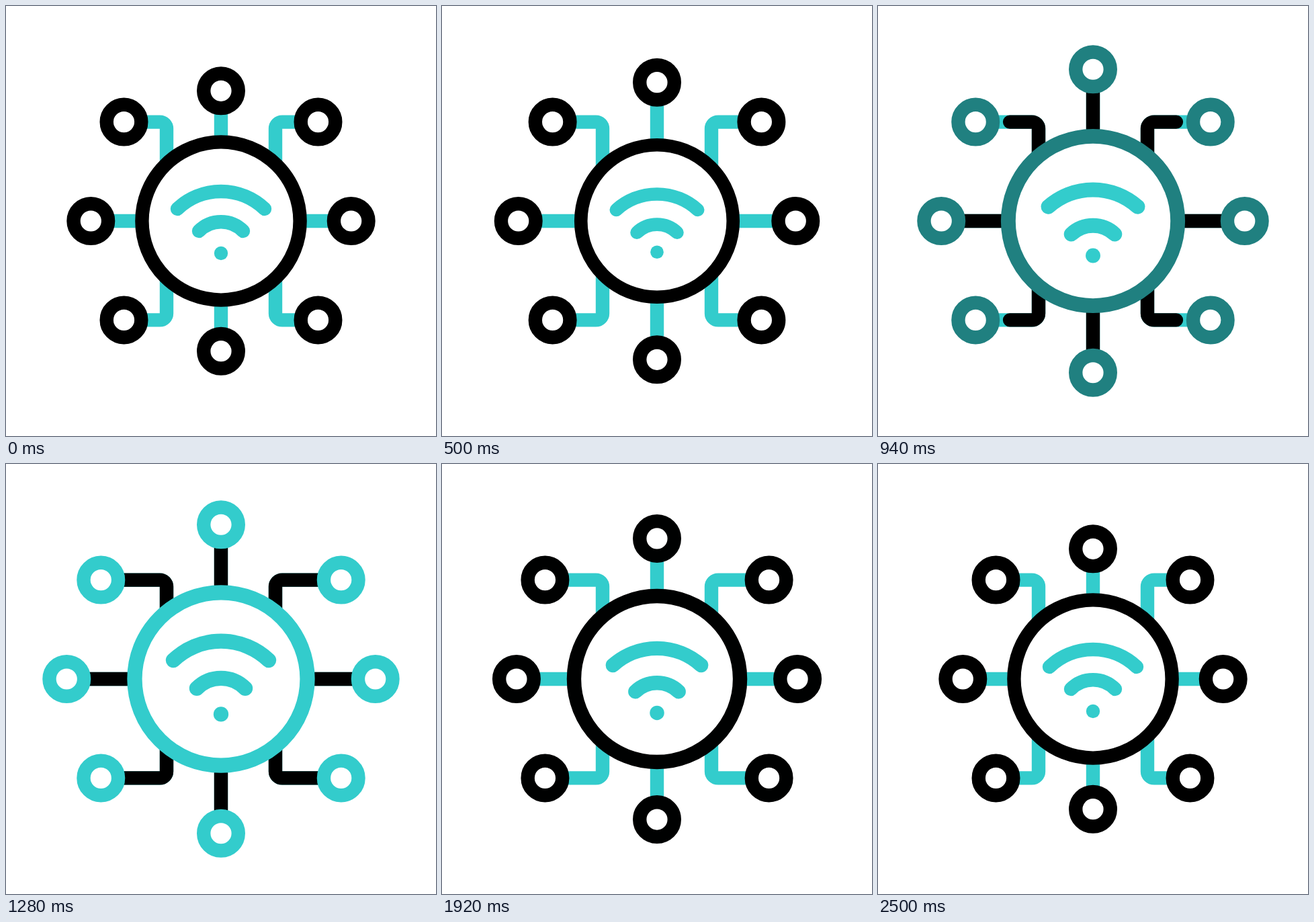
These frames come from a looping animation (640 px wide and 640 px high, 2.92 s). An HTML page:

```html
<!DOCTYPE html>
<html lang="en">
<head>
<meta charset="utf-8">
<title>Wireless network hub</title>
<style>
  html, body { margin: 0; width: 100%; height: 100%; overflow: hidden; background: #fff; }
  svg { display: block; width: 100vw; height: 100vh; }
  path, .ring { stroke-width: 20.4; }
  path { fill: none; }
  .ring { fill: #fff; }
  .wire { stroke: #3cc; }
  .flow { stroke: #000; stroke-linecap: round; }
  .wave { stroke: #3cc; stroke-linecap: round; }
</style>
</head>
<body>
<svg viewBox="-320 -320 640 640">
  <g id="arms"></g>
  <g id="hub">
    <circle class="ring" r="117.6"/>
    <circle cy="48" r="10.2" fill="#3cc"/>
  </g>
</svg>
<script>
const LOOP = 2920;
const svgNS = 'http://www.w3.org/2000/svg';

const ramp = (t, from, to) => Math.min(1, Math.max(0, (t - from) / (to - from)));
const smooth = u => u * u * (3 - 2 * u);
const settle = u => (1 - Math.exp(-4.4 * u)) / (1 - Math.exp(-4.4));
const easeOut = power => u => 1 - (1 - u) ** power;

// Moves from a rest value through steps of [start, end, value, easing].
const motion = (rest, ...steps) => t => steps.reduce(
  (value, [start, end, to, ease = smooth]) => value + (to - value) * ease(ramp(t, start, end)),
  rest);

// Every part first draws in, then springs out and finally returns to rest.
const straight = motion(193.7,
  [0, 300, 182.3], [300, 1620, 231, settle], [1620, 1720, 217], [1720, 2500, 193.7, easeOut(1.4)]);
const bent = motion(144.5,
  [0, 300, 131.5], [300, 1620, 180, settle], [1720, 2500, 144.5, easeOut(1.6)]);
const hubScale = motion(1,
  [0, 300, 0.953], [480, 1720, 1.1, settle], [1720, 2500, 1, easeOut(2.3)]);
const squash = motion(0, [360, 680, 1], [680, 1280, 0], [1500, 2180, 0.75], [2180, 2500, 0]);
const lift = motion(0, [680, 1280, 1], [1500, 2180, 0]);

function add(parent, tag, attrs) {
  const el = document.createElementNS(svgNS, tag);
  for (const key in attrs) el.setAttribute(key, attrs[key]);
  return parent.appendChild(el);
}

const armsBox = document.getElementById('arms');
const hub = document.getElementById('hub');

function makeArm(transform, isBent) {
  const g = add(armsBox, 'g', { transform });
  return {
    isBent,
    wire: add(g, 'path', { class: 'wire' }),
    flow: add(g, 'path', { class: 'flow', pathLength: 1 }),
    node: add(g, 'circle', { class: 'ring', r: 25.8 })
  };
}

const arms = [];
for (const sx of [-1, 1]) {
  for (const sy of [-1, 1]) {
    arms.push(makeArm(`rotate(${90 * sx + 45 * sy + 45})`, false));
    arms.push(makeArm(`scale(${sx} ${sy})`, true));
  }
}

// Half width, and heights of the ends and the top above the dot.
const waves = [
  { half: 65, ends: 66, top: 92, narrow: 5, drop: 2, sink: 6, rise: 7.5 },
  { half: 33, ends: 33, top: 46.8, narrow: 4.7, drop: 7, sink: 10, rise: 2.3 }
].map(shape => ({ ...shape, path: add(hub, 'path', { class: 'wave' }) }));

function drawArm({ isBent, wire, flow, node }, t) {
  const x = isBent ? bent(t) : 0;
  const y = isBent ? 147.4 : straight(t);
  const d = isBent ? `M81 74V${y - 10}A10 10 0 0 0 91 ${y}H${x}` : `M0 117.6V${y}`;
  const head = ramp(t, 632, 1080), tail = ramp(t, 1524, 1960);
  wire.setAttribute('d', d);
  flow.setAttribute('d', d);
  flow.setAttribute('stroke-dasharray', `${head - tail} 2`);
  flow.setAttribute('stroke-dashoffset', -tail);
  flow.setAttribute('visibility', head > tail ? 'visible' : 'hidden');
  node.setAttribute('cx', x);
  node.setAttribute('cy', y);
}

function drawWave({ half, ends, top, narrow, drop, sink, rise, path }, t) {
  const s = squash(t), up = rise * lift(t);
  const w = half - narrow * s;
  const y = ends - drop * s + up;
  const bulge = top - sink * s + up - y;
  const r = (w * w + bulge * bulge) / (2 * bulge);
  path.setAttribute('d', `M${-w} ${48 - y}A${r} ${r} 0 0 1 ${w} ${48 - y}`);
}

function draw(t) {
  const tint = ramp(t, 668, 1100) - ramp(t, 1482, 1922);
  armsBox.style.stroke = hub.firstElementChild.style.stroke =
    `rgb(${51 * tint}, ${204 * tint}, ${204 * tint})`;
  arms.forEach(arm => drawArm(arm, t));
  waves.forEach(wave => drawWave(wave, t));
  hub.setAttribute('transform', `scale(${hubScale(t)})`);
}

let start;
function tick(now) {
  start ??= now;
  draw(Math.max(0, now - start) % LOOP);
  requestAnimationFrame(tick);
}
draw(0);
requestAnimationFrame(tick);
</script>
</body>
</html>
```
